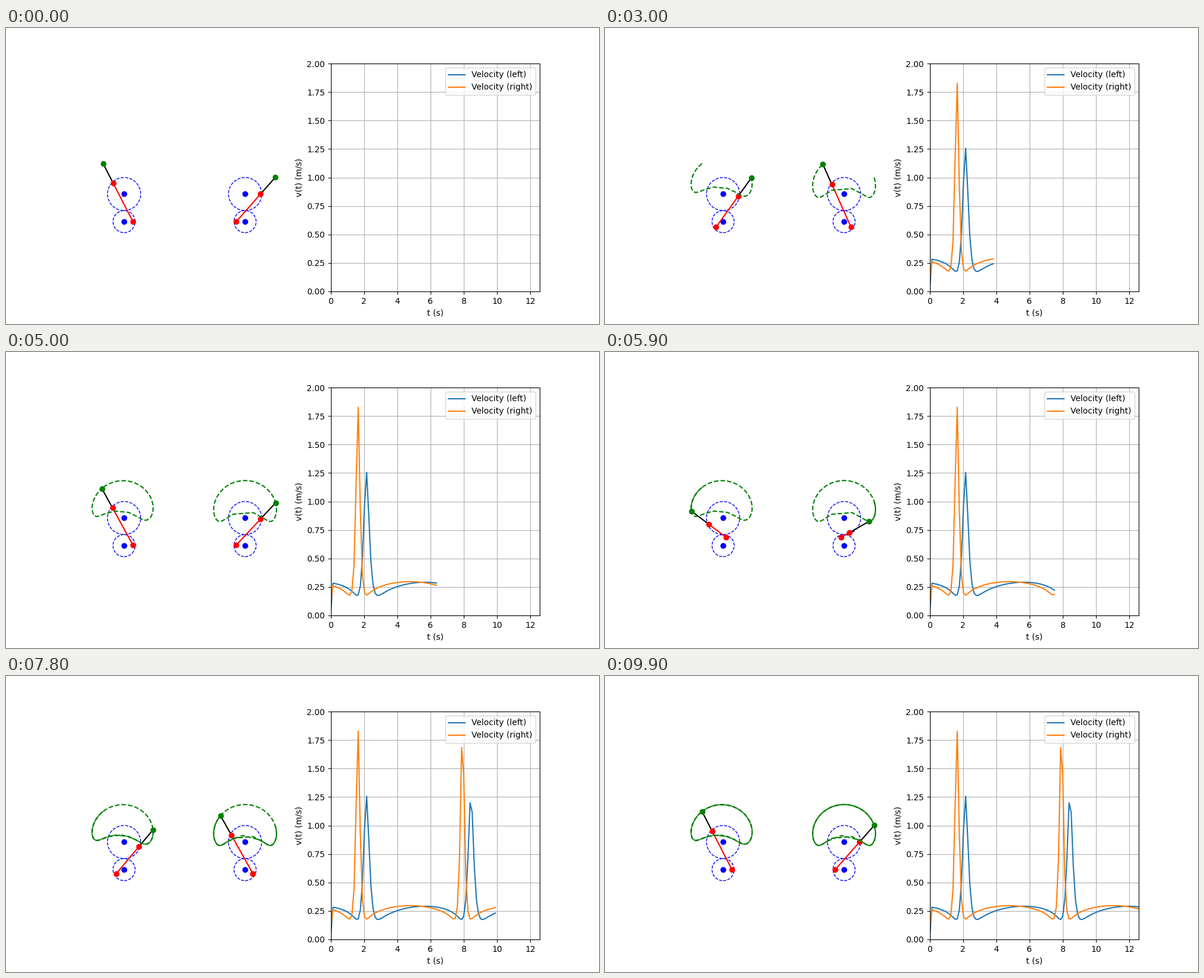
Write a matplotlib script that moves like this. It is 1000 px wide and 500 px high and loops after 10 s.

```python
import numpy as np
import matplotlib.pyplot as plt
from matplotlib.animation import FuncAnimation

INCH = 0.0254
FRAMES = 100
BIG_R, SMALL_R = 7.5 * INCH, 5 * INCH      # wheel radii
BIG_PIN, SMALL_PIN = 7 * INCH, 4 * INCH    # crank pin radii
TIP = 10 * INCH                            # rod length beyond the upper pin
BIG_Y, SMALL_Y = -7.5 * INCH, -20 * INCH
HALF_GAP = 0.695

t = np.linspace(0, 4 * np.pi, FRAMES)


def polar(radius, angle):
    return radius * np.exp(1j * angle)


class Linkage:
    """Two cranks at equal speed; a rod slides through the upper pin."""

    def __init__(self, ax, x, spin, big_phase, small_phase, start_speed):
        self.big = x + 1j * BIG_Y + polar(BIG_PIN, big_phase + spin * t)
        self.small = x + 1j * SMALL_Y + polar(SMALL_PIN, small_phase + spin * t)
        rod = self.big - self.small
        self.tip = self.big + TIP * rod / np.abs(rod)
        step = np.abs(np.diff(self.tip)) / (t[1] - t[0])
        self.speed = np.concatenate(([start_speed], step))

        for y, r in ((BIG_Y, BIG_R), (SMALL_Y, SMALL_R)):
            ax.add_patch(plt.Circle((x, y), r, fill=False, color="blue", ls="--"))
            ax.plot([x], [y], "o", color="blue")
        self.arm, = ax.plot([], [], "-", color="black")
        self.rod, = ax.plot([], [], "o-", color="red")
        self.dot, = ax.plot([], [], "o", color="green")
        self.trail, = ax.plot([], [], "--", color="green")

    def pose(self, i):
        for line, pts in (
            (self.arm, np.array([self.big[i], self.tip[i]])),
            (self.rod, np.array([self.small[i], self.big[i]])),
            (self.dot, self.tip[i:i + 1]),
            (self.trail, self.tip[:i + 1]),
        ):
            line.set_data(pts.real, pts.imag)


fig, (scene, chart) = plt.subplots(1, 2, figsize=(10, 5), dpi=100)

box = scene.get_position()
half_w = 1.2
half_h = half_w * (box.height * 5) / (box.width * 10)
left = Linkage(scene, -HALF_GAP, 1, 0.75 * np.pi, 0, 0.025)
right = Linkage(scene, HALF_GAP, -1, 0, np.pi, 0.11)
scene.set_xlim(-half_w, half_w)
scene.set_ylim(-half_h, half_h)
scene.axis("off")

left_curve, = chart.plot([], [], label="Velocity (left)")
right_curve, = chart.plot([], [], label="Velocity (right)")
chart.set_xlim(0, 4 * np.pi)
chart.set_ylim(0, 2)
chart.set_xlabel("t (s)")
chart.set_ylabel("v(t) (m/s)")
chart.grid(True)
chart.legend(loc="upper right")


def update(i):
    for link, curve in ((left, left_curve), (right, right_curve)):
        link.pose(i)
        curve.set_data(t[:i + 1], link.speed[:i + 1])
    return []


anim = FuncAnimation(fig, update, frames=FRAMES, interval=100,
                     repeat=True, repeat_delay=0, blit=False)
plt.show()
```
